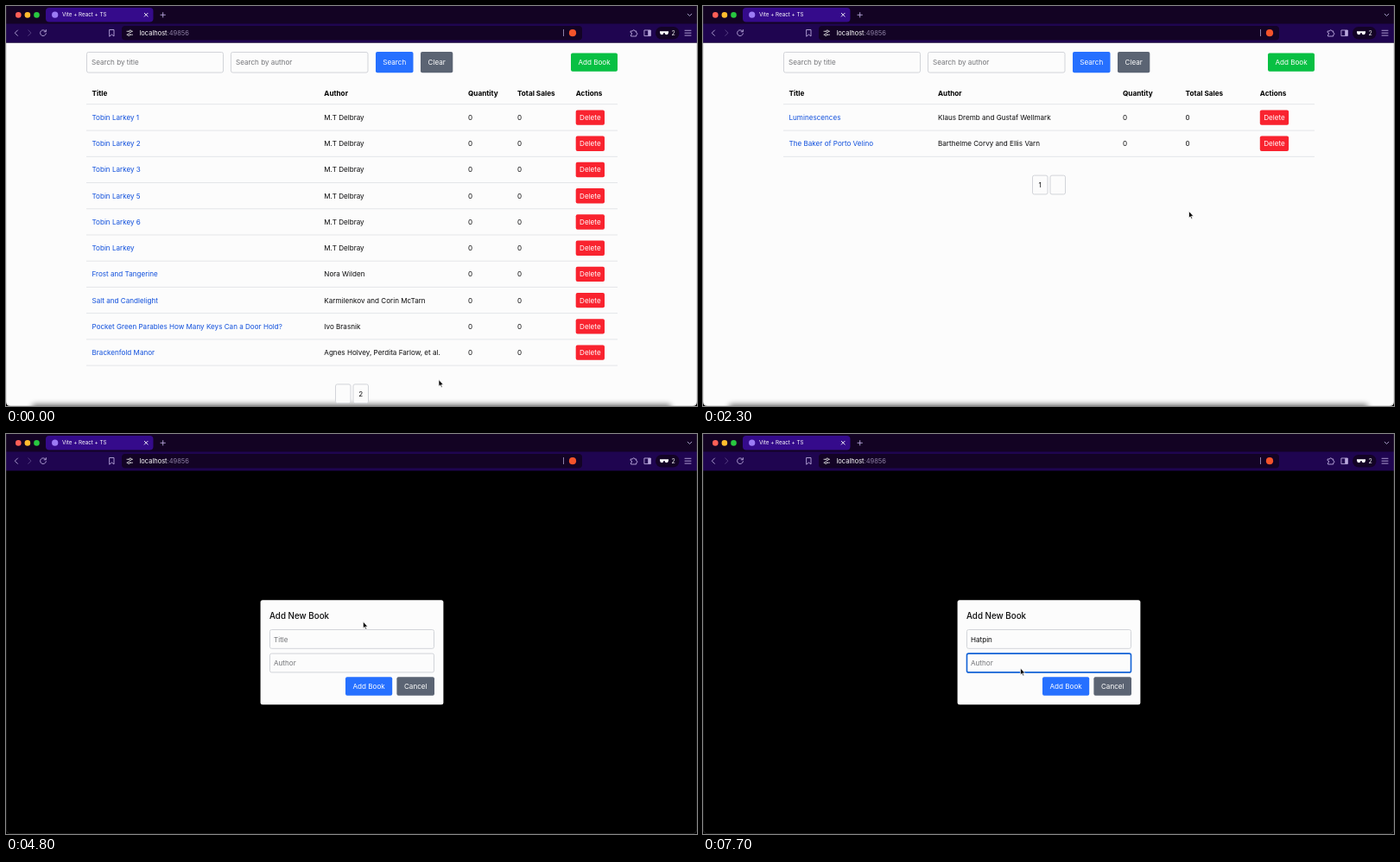
An HTML page that plays this animation: 800x463 px, repeating every 8000 ms.

```html
<!DOCTYPE html>
<html lang="en">
<head>
<meta charset="utf-8">
<title>Book list</title>
<style>
  html, body { margin: 0; width: 100%; height: 100%; overflow: hidden; background: #000; }
  svg { display: block; width: 800px; height: 463px; }
  text { font-family: Inter, "Liberation Sans", sans-serif; white-space: pre; }
  .icon { fill: none; stroke: #b9a9dc; stroke-width: .9; stroke-linecap: round; stroke-linejoin: round; }
</style>
</head>
<body>
<svg id="stage" viewBox="0 0 800 463"></svg>
<script>
const LOOP = 8000, STEP = 100;
const BLUE = '#2670ff', GRAY = '#5b6473', RED = '#f9232f', GREEN = '#08c043', DARK_GREEN = '#069a35';
const LINK = '#0f4fdc', HINT = '#737478', BORDER = '#d2d4d9', FOCUS = '#1262d6';

const rect = (x, y, w, h, fill, r = 0, more = '') =>
  `<rect x="${x}" y="${y}" width="${w}" height="${h}" rx="${r}" fill="${fill}" ${more}/>`;
const text = (x, y, s, fill = '#0b0b0c', size = 8.1, more = '') =>
  `<text x="${x}" y="${y}" font-size="${size}" fill="${fill}" ${more}>${s}</text>`;
const icon = (d, more = '') => `<path class="icon" d="${d}" ${more}/>`;
const circle = (x, y, r, fill) => `<circle cx="${x}" cy="${y}" r="${r}" fill="${fill}"/>`;
const group = (id, body) => `<g id="${id}">${body}</g>`;
const button = (x, y, w, h, label, fill, id = '') =>
  rect(x, y, w, h, fill, 2, id && `id="${id}"`) +
  text(x + w / 2, y + h / 2 + 2.9, label, '#fff', 8.1, 'text-anchor="middle"');
const field = (x, y, w, h, id = '') =>
  rect(x + .5, y + .5, w - 1, h - 1, '#fcfcfc', 2, `stroke="${BORDER}" ${id && `id="${id}"`}`);

function browser() {
  const lights = ['#ff5f57', '#febc2e', '#28c840'].map((c, i) => circle(14.3 + 10.6 * i, 10.4, 3.3, c)).join('');
  return rect(0, 0, 800, 21, '#130323') + rect(0, 20.5, 800, 22, '#1f0550') + lights +
    rect(46, 2, 124.5, 16.5, '#350b8b', 4) + circle(56.7, 10.2, 3.6, '#9c7bf5') +
    text(65, 12.4, 'Vite + React + TS', '#fff', 6.25) +
    icon('M160.3 8.3l3.8 3.8m0-3.8l-3.8 3.8', 'style="stroke:#fff"') +
    icon('M179 10.3h5.4M181.7 7.6V13M789.2 9.2l2.3 2.3l2.3-2.3') +
    icon('M13.5 28l-3.2 3.2l3.2 3.2') + icon('M25.8 28l3.2 3.2l-3.2 3.2', 'opacity=".4"') +
    icon('M45.8 29.2a3.4 3.4 0 1 0 .6 2.6M46.4 27.6v2.2h-2.2') +
    icon('M120 27.5h5v7.5l-2.5-2l-2.5 2z') +
    rect(134, 23, 533, 16.5, '#130325', 4) +
    icon('M140 29.3h2.5M145.3 29.3h1.2M140 33.2h1M143.8 33.2h2.7', 'style="stroke:#ddd"') +
    '<g fill="none" stroke="#ddd" stroke-width=".9"><circle cx="143.9" cy="29.3" r="1.3"/><circle cx="142.3" cy="33.2" r="1.3"/></g>' +
    text(154.5, 34, 'localhost<tspan fill="#8d80a4">:49856</tspan>', '#fff', 7.5) +
    rect(645, 27, 1, 8, '#8c7fa8') + circle(656, 31.2, 4.1, '#f4532b') +
    icon('M723.5 29h2a1.2 1.2 0 1 1 2.4 0h1.8v2a1.2 1.2 0 1 1 0 2.4v1.6h-6.2v-1.8a1.2 1.2 0 1 0 0-2.4z') +
    icon('M739.3 28h7v6.6h-7z') + rect(743.2, 28, 3.2, 6.6, '#b9a9dc') +
    rect(752, 24, 27.5, 14.5, '#130325', 7) +
    '<path d="M757 29.3h10v1.4q-.5 2.5-2.2 2.5q-1.9 0-2.3-2.3h-1q-.4 2.3-2.3 2.3q-1.7 0-2.2-2.5z" fill="#fff"/>' +
    text(770.5, 33.8, '2', '#fff', 7) +
    icon('M786 28.3h7M786 31.2h7M786 34.1h7');
}

function table(id, cols, books, current) {
  const [, , , , actions] = cols;
  const line = y => rect(93, y, 615, 1, '#e4e6e9');
  let out = ['Title', 'Author', 'Quantity', 'Total Sales', 'Actions']
    .map((s, i) => text(cols[i], 104, s, '#000', 8.2, 'font-weight="650"')).join('') + line(113.2);
  books.forEach(([title, author], i) => {
    const y = 30.22 * i, base = 132 + y;
    out += text(cols[0], base, title, LINK) + text(cols[1], base, author) +
      text(cols[2], base, 0) + text(cols[3], base, 0) +
      button(actions, 120.4 + y, 33.3, 17.4, 'Delete', RED) + line(143.6 + y);
  });
  const top = 135.2 + 30.22 * books.length;
  for (const page of [1, 2]) {
    const x = 360.5 + 20.5 * page;
    out += field(x, top, 18.5, 22.8);
    if (page !== current) out += text(x + 9.2, top + 14.4, page, '#0b0b0c', 8.1, 'text-anchor="middle"');
  }
  return group(id, out);
}

const series = ['1', '2', '3', '5', '6', ''].map(n => [`Tobin Larkey ${n}`, 'M.T Delbray']);
const firstPage = [...series,
  ['Frost and Tangerine', 'Nora Wilden'],
  ['Salt and Candlelight', 'Karmilenkov and Corin McTarn'],
  ['Pocket Green Parables How Many Keys Can a Door Hold?', 'Ivo Brasnik'],
  ['Brackenfold Manor', 'Agnes Holvey, Perdita Farlow, et al.']];
const secondPage = [
  ['Luminescences', 'Klaus Dremb and Gustaf Wellmark'],
  ['The Baker of Porto Velino', 'Barthelme Corvy and Ellis Varn']];

const list = group('list',
  '<path d="M0 42.5H800V458q0 5-5 5H5q-5 0-5-5z" fill="#fcfcfc"/>' +
  rect(30, 461, 740, 10, '#000', 4, 'opacity=".55" filter="url(#soft)"') +
  field(93, 53, 159, 24.5) + text(99, 68.4, 'Search by title', HINT) +
  field(260, 53, 159.5, 24.5) + text(266, 68.4, 'Search by author', HINT) +
  button(428, 53, 43.5, 24.3, 'Search', BLUE) + button(480, 53, 37.3, 24.3, 'Clear', GRAY) +
  button(654, 54.5, 54, 21.3, 'Add Book', GREEN, 'add') +
  table('page1', [99.5, 368.3, 535, 592, 659.7], firstPage, 1) +
  table('page2', [99.5, 272, 486, 558.6, 644.8], secondPage, 2));

const dialog = group('dialog',
  rect(0, 42.5, 800, 421, '#000') + rect(294.6, 192.2, 211.8, 121, '#fcfcfc', 2.5) +
  text(305, 214, 'Add New Book', '#0b0b0c', 9.8, 'font-weight="450"') +
  field(305, 226, 191, 22.8, 'titleField') + text(310, 240.5, 'Title', HINT, 8.1, 'id="titleText"') +
  rect(0, 232.7, .9, 9.4, '#000', 0, 'id="caret"') +
  field(305, 253.6, 191, 22.8, 'authorField') + text(310, 268.1, 'Author', HINT) +
  button(393, 281.3, 54.2, 21.4, 'Add Book', BLUE) + button(452.4, 281.3, 43.6, 21.4, 'Cancel', GRAY));

const stage = document.getElementById('stage');
stage.innerHTML = '<filter id="soft" x="-10%" y="-200%" width="120%" height="500%"><feGaussianBlur stdDeviation="3.2"/></filter>' +
  list + dialog + browser() +
  '<rect x=".25" y="-5" width="799.5" height="467.7" rx="5" fill="none" stroke="#777" stroke-width=".5" opacity=".5"/>' +
  '<path id="cursor" d="M0 0V7.8L1.8 6.2L3 9L4.2 8.5L3 5.8H5.4Z" fill="#000" stroke="#fff" stroke-width=".7" stroke-linejoin="round"/>';

const $ = id => document.getElementById(id);
const show = (id, on) => $(id).setAttribute('display', on ? 'inline' : 'none');

// Pointer stops: time, x, y
const path = [[0, 501, 432.5], [600, 412, 446], [800, 412, 446], [1100, 416, 444], [1600, 416, 444],
  [2300, 562.5, 237.5], [2600, 612, 170], [3400, 672.5, 72.5], [4100, 672.5, 72.5],
  [5000, 376, 238], [6500, 376, 238], [7400, 367.5, 271]];
const typed = [[5600, 'H'], [5800, 'Ha'], [6000, 'Hat'], [6200, 'Hatp'], [6300, 'Hatpi'], [6400, 'Hatpin']];

function pointer(t) {
  const i = path.findIndex(p => p[0] > t);
  if (i < 0) return path.at(-1).slice(1);
  const [a, b] = [path[i - 1], path[i]];
  const u = (t - a[0]) / (b[0] - a[0]), k = u * u * (3 - 2 * u);
  return [a[1] + (b[1] - a[1]) * k, a[2] + (b[2] - a[2]) * k];
}

function outline(id, focused) {
  $(id).setAttribute('stroke', focused ? FOCUS : BORDER);
  $(id).setAttribute('stroke-width', focused ? 1.6 : 1);
}

function draw(now) {
  const t = Math.floor(now % LOOP / STEP) * STEP;
  const open = t >= 3700, onTitle = t >= 5100 && t < 7500;
  show('list', !open);
  show('dialog', open);
  show('page1', t < 800);
  show('page2', t >= 800);
  $('add').setAttribute('fill', t >= 3300 ? DARK_GREEN : GREEN);

  const word = typed.findLast(k => k[0] <= t)?.[1] ?? '';
  const title = $('titleText');
  title.textContent = word || 'Title';
  title.setAttribute('fill', word ? '#0b0b0c' : HINT);
  outline('titleField', onTitle);
  outline('authorField', t >= 7500);
  show('caret', onTitle && t < 6900);
  $('caret').setAttribute('x', 310 + (word && open ? title.getComputedTextLength() : 0));

  show('cursor', t < 5600 || t >= 6600);
  $('cursor').setAttribute('transform', `translate(${pointer(t)})`);
  requestAnimationFrame(draw);
}
requestAnimationFrame(draw);
</script>
</body>
</html>
```
